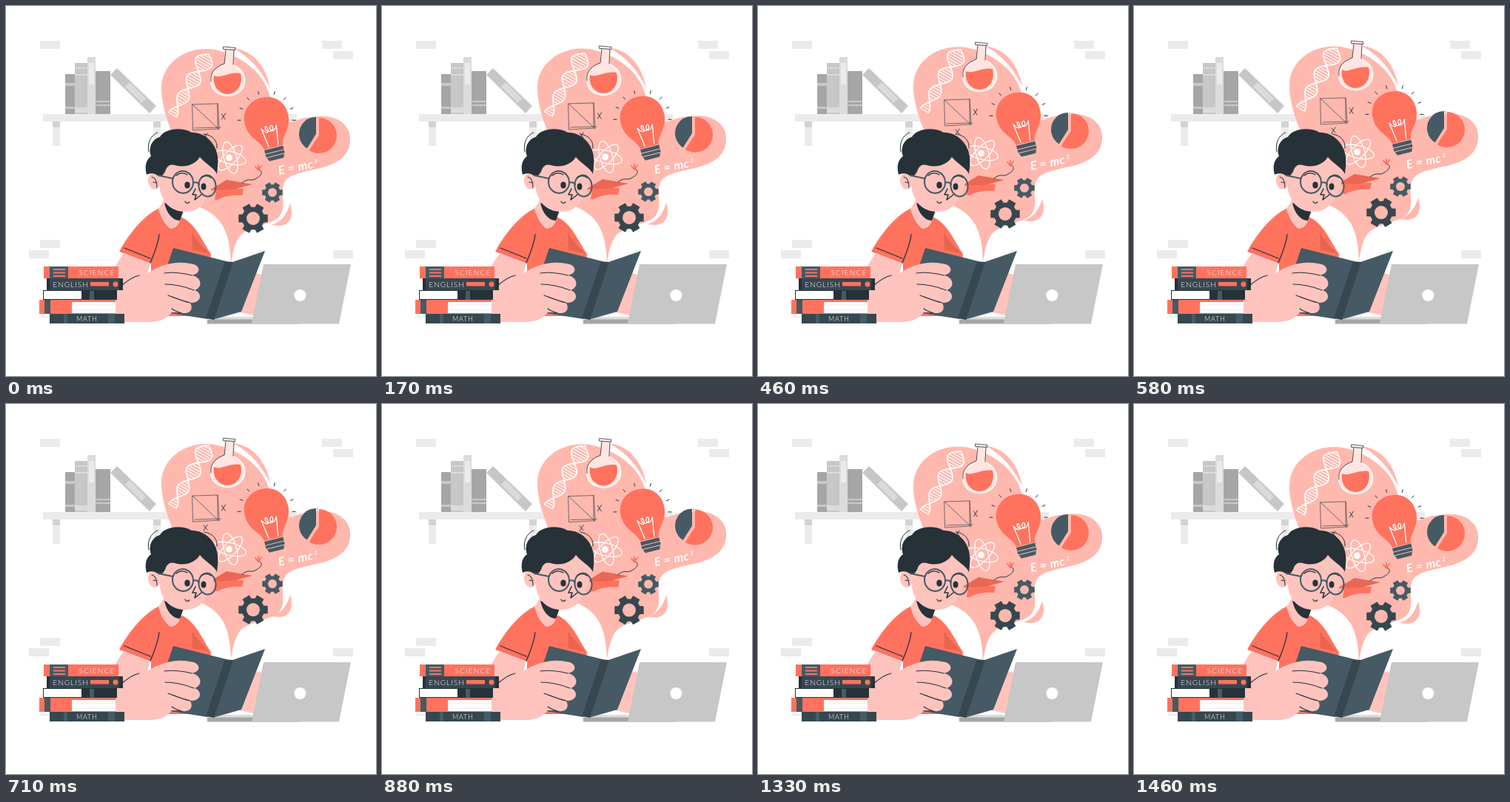
An HTML page with a canvas for the animation above (1.5 s loop, 500x500 px).

```html
<!DOCTYPE html>
<html lang="en">
<head>
<meta charset="utf-8">
<title>Reading</title>
<style>
  html, body { margin: 0; width: 100%; height: 100%; overflow: hidden; background: #fff; }
  canvas { display: block; width: 500px; height: 500px; }
</style>
</head>
<body>
<canvas id="stage" width="500" height="500"></canvas>
<script>
const ctx = document.getElementById('stage').getContext('2d');
const LOOP = 1500, STEPS = 36, IDEA_RISE = 9, CLOUD_RISE = 4;
const ORANGE = '#ff725e', PINK = '#ffb8ae', SKIN = '#ffc3bd', INK = '#263238',
      NAVY = '#37474f', SLATE = '#455a64', PALE = '#ebebeb', LIGHT = '#dbdbdb',
      MID = '#c7c7c7', GRAY = '#a6a6a6', WHITE = '#fff';
const TAU = Math.PI * 2, rad = deg => deg * Math.PI / 180;

function fill(d, color) {
  ctx.fillStyle = color;
  ctx.fill(new Path2D(d));
}
function line(d, color = INK, width = 1) {
  ctx.strokeStyle = color;
  ctx.lineWidth = width;
  ctx.stroke(new Path2D(d));
}
function rect(x, y, w, h, color) {
  ctx.fillStyle = color;
  ctx.fillRect(x, y, w, h);
}
function oval(x, y, rx, ry, color, angle = 0) {
  ctx.fillStyle = color;
  ctx.beginPath();
  ctx.ellipse(x, y, rx, ry, angle, 0, TAU);
  ctx.fill();
}
function ring(x, y, rx, ry, color, width, angle = 0) {
  ctx.strokeStyle = color;
  ctx.lineWidth = width;
  ctx.beginPath();
  ctx.ellipse(x, y, rx, ry, angle, 0, TAU);
  ctx.stroke();
}
function sector(x, y, r, from, to, color) {
  ctx.fillStyle = color;
  ctx.beginPath();
  ctx.moveTo(x, y);
  ctx.arc(x, y, r, rad(from), rad(to));
  ctx.fill();
}
function label(text, x, y, font, spacing, color = WHITE) {
  ctx.font = font;
  ctx.letterSpacing = spacing + 'px';
  ctx.fillStyle = color;
  ctx.fillText(text, x, y);
}
function raised(amount, paint) {
  ctx.save();
  ctx.translate(0, -amount);
  paint();
  ctx.restore();
}

function drawRoom() {
  for (const [x, y] of [[46, 47], [427, 47], [442, 61], [46, 316], [31, 330], [442, 330]])
    rect(x, y, 27, 11, PALE);
  rect(50, 146, 343, 10, PALE);
  for (const x of [63, 199]) {
    rect(x, 156, 10, 33, PALE);
    rect(x, 156, 10, 8, '#d2d2d2');
  }

  rect(80, 92, 14, 54, GRAY);
  rect(80, 104, 14, 4, MID);
  rect(80, 136, 14, 3, MID);
  rect(93, 77, 17, 69, MID);
  rect(93, 83, 17, 1.5, LIGHT);
  rect(93, 92, 17, 2, LIGHT);
  rect(93, 137, 17, 7, LIGHT);
  rect(110, 69, 11, 77, LIGHT);
  rect(112, 77, 7, 29, PALE);
  rect(121, 88, 20, 58, GRAY);
  rect(121, 128, 20, 2, MID);
  rect(121, 133, 20, 2, MID);
  fill('M141 93L150 84L203 135L194 145Z', MID);
  fill('M161 109L167 103L189 125L183 131Z', LIGHT);
}

function drawCloud() {
  fill(`M304 349C303 314 297 286 262 272L230 185C222 165 210 138 210 111
    C210 80 238 58 270 58C302 58 343 82 354 114C361 135 366 157 386 157
    C398 151 414 149 430 149C453 150 467 165 465 183C464 204 445 214 425 219
    C400 225 379 227 375 242C370 256 379 267 371 282C364 296 329 296 316 311
    C308 322 306 336 304 349Z`, PINK);
  line('M300 61C327 69 346 90 357 116', WHITE, 3);
  fill('M307 57C335 60 352 83 357 111C345 87 330 69 307 57Z', PINK);
}

function drawHelix() {
  const at = (u, side) => {
    const wave = Math.cos(u * Math.PI * 3.5) * (6 + 7 * u) * side;
    return [225 + 49 * u + wave * 0.87, 147 - 82 * u + wave * 0.5];
  };
  ctx.strokeStyle = WHITE;
  ctx.lineWidth = 1.6;
  for (const side of [-1, 1]) {
    ctx.beginPath();
    for (let i = 0; i <= 80; i++) ctx.lineTo(...at(i / 80, side));
    ctx.stroke();
  }
  ctx.lineWidth = 1.2;
  ctx.beginPath();
  for (let i = 0; i <= 26; i++) {
    ctx.moveTo(...at(i / 26, -1));
    ctx.lineTo(...at(i / 26, 1));
  }
  ctx.stroke();
}

function drawFlask() {
  fill('M295 57L309 58L308 80C333 90 324 122 299 122C271 121 270 87 296 79Z', '#ffe5e1');
  fill('M281 94C290 99 302 88 317 91C321 108 311 119 299 119C287 118 279 108 281 94Z', ORANGE);
  line('M296 79C269 88 271 120 299 121.5C326 121 331 90 308 80', WHITE, 1.3);
  line('M294 55L310 56.5L309.5 59.5L294 58.5ZM297 60L295 78C281 83 276 91 277 102M308 60L307 79', INK, .8);
}

function drawGeometry() {
  line('M252 133L286 132L288 166L253 168ZM252 133L288 167M286 132L286 165M255 165L290 164', NAVY, .7);
  line('M291.5 146L296 153M296.5 145L291.5 153M267 173L272 179M272 172L267 180', INK, .9);
}

function drawBulb() {
  ctx.save();
  ctx.translate(352, 153);
  for (let k = 0; k < 4; k++)
    for (const side of [-1, 1]) {
      const a = rad(-90 + side * (17 + 25 * k));
      line(`M${35 * Math.cos(a)} ${35 * Math.sin(a)}L${39 * Math.cos(a)} ${39 * Math.sin(a)}`, INK, 1);
    }
  ctx.rotate(rad(-14));
  fill('M-13 39C-14 27 -30 20 -30 0C-30 -40 30 -40 30 0C30 20 14 27 13 39Z', ORANGE);
  line('M-6 37L-10 11C-4 21 0 18 -2 11C-5 4 -7 18 1 17C9 16 5 5 2 12C0 19 7 19 11 11L7 37', WHITE, 1.3);
  rect(-13, 40, 26, 5, SLATE);
  rect(-13, 46, 26, 4, SLATE);
  fill('M-12 51H12L10 56H-10Z', SLATE);
  ctx.restore();
}

function drawGear(x, y, r, hole, color) {
  ctx.fillStyle = color;
  ctx.beginPath();
  for (let k = 0; k < 6; k++)
    for (const [turn, size] of [[-21, .77], [-15, 1.02], [15, 1.02], [21, .77]]) {
      const a = rad(k * 60 + turn);
      ctx.lineTo(x + r * size * Math.cos(a), y + r * size * Math.sin(a));
    }
  ctx.fill();
  oval(x, y, hole, hole, PINK);
}

function drawAtom() {
  for (const deg of [14, 74, 134]) ring(303, 205, 22, 8.5, WHITE, 1.3, rad(deg));
  oval(301.5, 205, 4.5, 4.5, WHITE);
}

function drawPie() {
  sector(419, 173, 23, 122, 270, SLATE);
  sector(423, 175, 24, -90, 126, ORANGE);
  line('M421 150L421 175L408 196', PINK, 2);
}

function drawCap() {
  fill('M282 262L284 249L298 246L321 247L319 256C306 255 294 257 286 262Z', ORANGE);
  fill('M275 249L298 235L333 241L307 248Z', '#e96855');
  line('M319 239C328 231 332 238 338 233C346 229 348 223 341 221', INK, 1);
  line('M341 222L337 217M341 222L341 215M341 222L345 216', ORANGE, 1.8);
}

function drawFormula() {
  ctx.save();
  ctx.translate(369, 228);
  ctx.rotate(rad(-11));
  label('E = mc', 0, 0, 'italic bold 16px Lato, sans-serif', .5);
  label('2', 50, -6, 'italic bold 7px Lato, sans-serif', 0);
  ctx.restore();
}

function drawIdeas() {
  fill('M384 267C389 283 385 296 369 297L358 296C372 292 379 283 384 267Z', PINK);
  drawHelix();
  drawFlask();
  drawGeometry();
  drawBulb();
  drawAtom();
  drawPie();
  drawCap();
  drawGear(334, 287, 20, 9, NAVY);
  drawGear(360, 252, 14, 6, SLATE);
  drawFormula();
}

function drawBoy() {
  // shirt and neck
  fill('M209 272C184 284 165 310 153 332L196 348L196 419H270L277 335C265 318 257 294 236 285Z', ORANGE);
  fill('M251 307C258 317 266 326 274 334L252 330Z', '#e5654f');
  line('M160 327L195 341M207 309C205 325 199 337 195 347', INK, 1.3);
  fill('M206 274L215 260L240 276L235 290C233 297 228 301 222 301C214 295 209 285 206 274Z', SKIN);
  fill('M214 266L240 276L235 290C225 290 217 280 214 266Z', INK);

  // face
  oval(200, 237, 8, 11, SKIN, rad(-15));
  fill('M205 222L208 248C212 268 225 278 243 278C260 278 268 267 273 256C279 246 283 232 284 213L262 198L212 204Z', SKIN);
  line('M197 231C202 232 204 238 204 245M199 238L204 239', INK, 1.1);

  // hair
  fill(`M190 228C187 217 189 208 196 203C192 192 197 180 208 177
    C213 167 235 162 251 171C262 170 278 178 284 195C288 207 286 218 285 227
    C281 218 270 214 262 204C255 215 242 219 228 215C221 213 218 217 216 221
    C214 228 209 231 206 230C202 226 196 225 190 228Z`, INK);
  line('M193 197C190 184 197 174 205 171M268 173C280 175 286 183 285 192', INK, 1);

  // glasses and features
  line('M206 229L225 233M253 239C257 237 259 239 261 241', SLATE, 2);
  ring(239, 238, 14, 15, SLATE, 2, rad(-8));
  ring(272, 243, 11.5, 14.5, SLATE, 2, rad(-8));
  oval(245, 242, 3.7, 4.5, INK);
  oval(267, 244, 3.5, 4.5, INK);
  line('M230 229C235 225 240 225 245 228M264 232C268 229 273 229 277 232', INK, 1.3);
  line('M256 247L252 255L257 255L255 262L264 255', INK, 1.5);
  line('M242 264C243 267 246 267 248 265', INK, 1.2);
}

function drawDesk() {
  rect(45, 419.5, 16, 1, LIGHT);
  fill('M338 361L348 364L335 418L316 414Z', SKIN);
  rect(276, 420, 58, 4, LIGHT);
  rect(272, 423.5, 123, 6, GRAY);
  fill('M348 349H466L450 429.5H332Z', MID);
  oval(397.5, 391, 8, 8, WHITE);
}

function drawBook() {
  fill('M226 327L298 345L272 423L222 415L202 398Z', SLATE);
  fill('M306 346L350 331L318 413L279 424Z', SLATE);
  fill('M296 345L307 346L281 424L270 422Z', NAVY);
}

function drawArm() {
  fill(`M160 334L195 348L191 361C208 350 229 344 248 348C263 349 265 361 251 364
    C264 366 267 380 255 384C267 389 263 402 249 401C254 411 248 418 234 414
    L224 414C217 423 208 427 193 427H146V356C150 347 154 340 160 334Z`, SKIN);
  line('M156 378C165 370 171 366 180 364', INK, 1.2);
  line('M214 361C228 359 239 361 251 364M215 376C228 376 241 379 254 384M219 391C230 395 239 399 249 401M224 409C228 412 231 413 237 415', INK, 1.1);
}

function drawStack() {
  const font = '300 10px Lato, sans-serif';
  rect(51, 352, 101, 16, ORANGE);
  rect(59, 352, 25, 16, SLATE);
  for (const y of [355, 359.5, 364]) rect(64, y, 16, 2, ORANGE);
  label('SCIENCE', 98.5, 363.5, font, 1.2);

  rect(55, 368, 103, 16, NAVY);
  rect(55, 368, 4, 16, INK);
  rect(153, 368, 5, 16, INK);
  label('ENGLISH', 63.5, 379.5, font, 1);
  rect(114, 373, 25, 5.5, ORANGE);
  oval(148, 376, 3.5, 3.5, ORANGE);

  rect(50, 384, 100, 13, INK);
  rect(51, 385, 51, 11, WHITE);
  rect(113, 385, 6, 12, SLATE);

  rect(45, 397, 103, 19, ORANGE);
  rect(52, 397, 8, 19, SLATE);
  rect(89, 400, 59, 15, WHITE);
  ctx.setLineDash([1, 1.5]);
  line('M91 404H147M91 411H147', LIGHT, .8);
  ctx.setLineDash([]);

  rect(59, 416, 101, 13, NAVY);
  rect(78, 416, 5, 13, SLATE);
  rect(138, 416, 9, 13, SLATE);
  label('MATH', 95, 426, '300 9px Lato, sans-serif', .8);
}

function draw(time) {
  const step = Math.floor((time % LOOP) / LOOP * STEPS + .1);
  const lift = (1 - Math.cos(step / STEPS * TAU)) / 2;
  rect(0, 0, 500, 500, WHITE);
  drawRoom();
  raised(lift * CLOUD_RISE, drawCloud);
  raised(lift * IDEA_RISE, drawIdeas);
  drawBoy();
  drawDesk();
  drawBook();
  drawArm();
  drawStack();
}

ctx.lineCap = ctx.lineJoin = 'round';
const start = performance.now();
function tick() {
  draw(performance.now() - start);
  requestAnimationFrame(tick);
}
tick();
</script>
</body>
</html>
```
